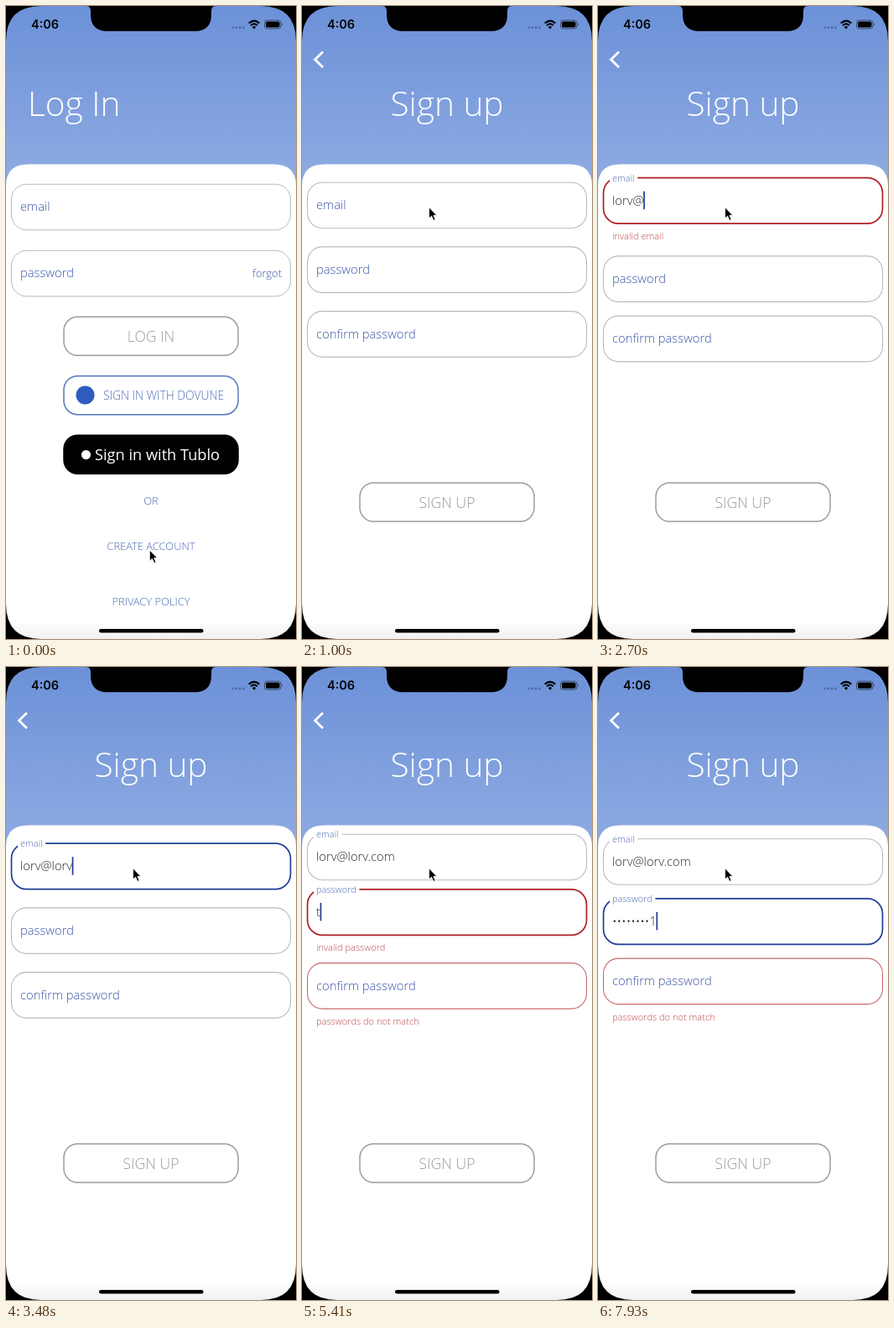
An HTML page that plays this animation: 346x754 px, repeating every 8000 ms.

```html
<!DOCTYPE html>
<html lang="en">
<head>
<meta charset="utf-8">
<title>Sign up form</title>
<style>
  html, body { margin: 0; width: 100%; height: 100%; overflow: hidden; background: #000; }
  svg { display: block; width: 100vw; height: 100vh; }
  text { font-family: "Open Sans", "Noto Sans", sans-serif; font-weight: 300; white-space: pre; }
  .clock { font: 600 14.5px Inter, Roboto, sans-serif; }
</style>
</head>
<body>
<svg id="stage" viewBox="0 0 346 754">
  <defs>
    <linearGradient id="sky" x1="0" y1="0" x2="0" y2="1">
      <stop offset="0" stop-color="#6c91d8"/>
      <stop offset="1" stop-color="#8fabe2"/>
    </linearGradient>
    <linearGradient id="foot" x1="0" y1="0" x2="0" y2="1">
      <stop offset="0" stop-color="#fff"/>
      <stop offset="1" stop-color="#f1f1f1"/>
    </linearGradient>
  </defs>
  <g id="login"></g>
  <g id="signup"></g>
  <g id="phone"></g>
  <path id="pointer" d="M0 0V13.2L3.1 10.4L5.4 15.6L7.7 14.6L5.4 9.6H9.4Z" fill="#000" stroke="#fff" stroke-width=".9"/>
</svg>
<script>
const LOOP = 8000, FADE = 167;
const INK = '#3a55a6', LINK = '#4c6bb5', GREY = '#9c9c9c';
const TEXT_X = 17, BODY = 14.77, SMALL = 11.08;
const FIELD_H = 54.5, ERROR_H = 22, SHEET_Y = 188, FORM_H = 252.3;

const $ = id => document.getElementById(id);
const clamp = v => Math.min(1, Math.max(0, v));
const mix = (a, b, p) => a + (b - a) * p;
const mixColor = (a, b, p) => a.map((v, i) => mix(v, b[i], p));

// Cubic bezier easing through (0,0) and (1,1)
function bezier(x1, y1, x2, y2) {
  const at = (a, b, s) => 3 * a * s * (1 - s) ** 2 + 3 * b * s * s * (1 - s) + s ** 3;
  return x => {
    let lo = 0, hi = 1;
    for (let i = 0; i < 24; i++) {
      const mid = (lo + hi) / 2;
      if (at(x1, x2, mid) < x) lo = mid; else hi = mid;
    }
    return at(y1, y2, lo);
  };
}
const standard = bezier(.4, 0, .2, 1);
const slide = bezier(.35, .91, .33, .97);
const ramp = (t, start, length, ease = standard) => ease(clamp((t - start) / length));

// Markup helpers
const label = (x, y, size, fill, str, more = '') =>
  `<text x="${x}" y="${y}" font-size="${size}" fill="${fill}" ${more}>${str}</text>`;
const centered = (y, size, fill, str, x = 173) =>
  label(x, y, size, fill, str, 'text-anchor="middle"');
const box = (y, stroke, h = FIELD_H) =>
  `<rect x="6.5" y="${y}" width="333" height="${h}" rx="18" fill="none" stroke="${stroke}"/>`;
const button = (y, stroke, fill = '#fff') =>
  `<rect x="69" y="${y}" width="208" height="46" rx="16.5" fill="${fill}" stroke="${stroke}" stroke-width="1.5"/>`;
const backdrop = () => `
  <rect width="346" height="754" fill="#fff"/>
  <rect width="346" height="216" fill="url(#sky)"/>
  <path d="M0 216V214Q0 188.500 27 188.500H319Q346 188.500 346 214V754H0Z" fill="#fff"/>
  <rect y="732" width="346" height="22" fill="url(#foot)"/>`;

$('login').innerHTML = backdrop() +
  label(26, 131, 40.6, '#fff', 'Log In') +
  box(212.3, '#b9b9b9') + label(TEXT_X, 244, BODY, INK, 'email') +
  box(291.3, '#b9b9b9') + label(TEXT_X, 322.5, BODY, INK, 'password') +
  label(329, 323, 12.92, INK, 'forgot', 'text-anchor="end"') +
  button(370.3, GREY) + centered(400, 17.6, GREY, 'LOG IN') +
  button(440.7, '#5878bd') + '<circle cx="94.500" cy="463.500" r="11" fill="#2d5cbe"/>' +
  label(116, 468.7, 13.85, LINK, 'SIGN IN WITH DOVUNE') +
  button(511.2, '#000', '#000') + '<circle cx="95.500" cy="534.500" r="5.500" fill="#fff"/>' +
  label(106, 540.7, 18.2, '#fff', 'Sign in with Tublo', 'style="font-weight:400"') +
  centered(594.3, 12.92, LINK, 'OR') +
  centered(647.7, 12.92, LINK, 'CREATE ACCOUNT') +
  centered(714, 12.92, LINK, 'PRIVACY POLICY');

$('signup').innerHTML = backdrop() +
  '<path d="M25 54.500L15.500 63.700L25 73" fill="none" stroke="#fff" stroke-width="2.700"/>' +
  centered(131, 40.6, '#fff', 'Sign up') +
  button(568, GREY) + centered(597.5, 17.6, GREY, 'SIGN UP') +
  '<g id="form"></g>';

$('phone').innerHTML = `
  <path d="M0 0H42Q0 0 0 42ZM346 0V42Q346 0 304 0ZM0 754V712Q0 754 42 754ZM346 754H304Q346 754 346 712Z"/>
  <path d="M96 0Q101 0 101 6V10Q101 30 121 30H225Q245 30 245 10V6Q245 0 250 0Z"/>
  <text class="clock" x="30" y="27.300">4:06</text>
  <path d="M269.500 25.700h15" stroke="#3c5488" stroke-opacity=".65" stroke-width="2.400" stroke-dasharray="2.400 1.800"/>
  <g fill="none" stroke="#000" stroke-width="2">
    <path d="M289.700 20.500Q296 14.700 302.300 20.500M292 23Q296 19.400 300 23"/>
  </g>
  <path d="M293.800 25Q296 23 298.200 25L296 27.400Z"/>
  <rect x="308.500" y="17" width="19.500" height="10" rx="3" fill="none" stroke="#000" stroke-opacity=".5"/>
  <rect x="310" y="18.500" width="16.500" height="7" rx="1.700"/>
  <path d="M329.300 20.300q1.800 1.700 0 3.400z" fill-opacity=".6"/>
  <rect x="111" y="742" width="124.500" height="4.600" rx="2.300"/>`;

const never = Infinity;
const fields = [
  { name: 'email', focus: [1200, 4355], value: 'lorv@lorv.com', error: 'invalid email',
    keys: [1590, 1780, 1960, 2110, 2700, 2960, 3110, 3330, 3480, 3740, 3890, 4030, 4180],
    wrong: [[1590, 2960], [3740, 3890]] },
  { name: 'password', focus: [4355, never], value: 'testtest1', error: 'invalid password', secret: true,
    keys: [5000, 5820, 6040, 6260, 6890, 7040, 7260, 7410, 7700],
    wrong: [[5000, 7700]] },
  { name: 'confirm password', focus: [never, never], value: '', error: 'passwords do not match',
    keys: [], wrong: [[5000, never]] }
];

for (const f of fields) {
  f.node = document.createElementNS('http://www.w3.org/2000/svg', 'g');
  f.node.innerHTML = box(0, '#bbb') + '<rect x="14" y="-3" height="9" fill="#fff"/>' +
    label(0, 0, BODY, INK, f.name) +
    label(TEXT_X, 32, BODY, '#2a2a2a', '') +
    label(TEXT_X, 0, SMALL, '#bd4a4d', f.error) +
    '<rect y="16" width="1.700" height="21.500" fill="#1f3c98"/>';
  $('form').append(f.node);
  [f.frame, f.gap, f.label, f.text, f.note, f.caret] = f.node.children;
}

const shown = (f, t) => f.wrong.find(([on, off]) => t >= on && t < off + FADE);

// The caret stays solid after a key, then fades in and out
function caretAlpha(since) {
  const late = since - 650;
  if (late < 0) return 1;
  const p = clamp((late % 500) / 250);
  return Math.floor(late / 500) % 2 ? p : 1 - p;
}

function drawField(f, t, y) {
  const [start, end] = f.focus;
  const focus = ramp(t, start, FADE) - ramp(t, end, FADE);
  const lift = ramp(t, start, FADE);
  const span = shown(f, t);
  const bad = span ? ramp(t, span[0], FADE) - ramp(t, span[1], FADE) : 0;
  const calm = mixColor([184, 186, 190], [31, 60, 150], focus);
  const alarm = mixColor([200, 105, 108], [176, 30, 34], focus);

  f.node.setAttribute('transform', `translate(0 ${y})`);
  f.frame.setAttribute('stroke', `rgb(${mixColor(calm, alarm, bad)})`);
  f.frame.setAttribute('stroke-width', mix(1.1, 1.7, focus));
  f.gap.setAttribute('width', lift * (f.nameWidth * .75 + 6.5));
  f.label.setAttribute('transform', `translate(${TEXT_X} ${mix(32, 4, lift)}) scale(${mix(1, .75, lift)})`);
  f.label.setAttribute('fill', lift > .5 ? LINK : INK);
  f.note.setAttribute('y', FIELD_H + 19 - 3 * (1 - bad));
  f.note.setAttribute('opacity', bad);

  const count = f.keys.filter(k => t >= k).length;
  f.text.textContent = f.secret && count
    ? '•'.repeat(count - 1) + f.value[count - 1]
    : f.value.slice(0, count);
  const active = t >= start + 20 && t < end;
  f.caret.setAttribute('x', TEXT_X - .4 + (count ? f.text.getComputedTextLength() : 0));
  f.caret.setAttribute('opacity', active ? caretAlpha(t - (f.keys[count - 1] || start)) : 0);
}

function drawForm(t) {
  // Free height is shared evenly above, between and below the fields
  const heights = fields.map(f => FIELD_H + (shown(f, t) ? ERROR_H : 0));
  const gap = (FORM_H - heights.reduce((a, b) => a + b)) / 4;
  let y = SHEET_Y + gap;
  fields.forEach((f, i) => {
    drawField(f, t, y);
    y += heights[i] + gap;
  });
}

function draw(t) {
  const p = ramp(t, 60, 500, slide);
  $('login').setAttribute('transform', `translate(${-115 * p} 0)`);
  $('signup').setAttribute('transform', `translate(${346 * (1 - p)} 0)`);
  drawForm(t);
  const move = ramp(t, 260, 560);
  $('pointer').setAttribute('transform', `translate(${mix(171.3, 151.5, move)} ${mix(648, 239.8, move)})`);
}

function tick(now) {
  for (const f of fields) f.nameWidth = f.label.getComputedTextLength();
  draw(now % LOOP);
  requestAnimationFrame(tick);
}
tick(0);
</script>
</body>
</html>
```
